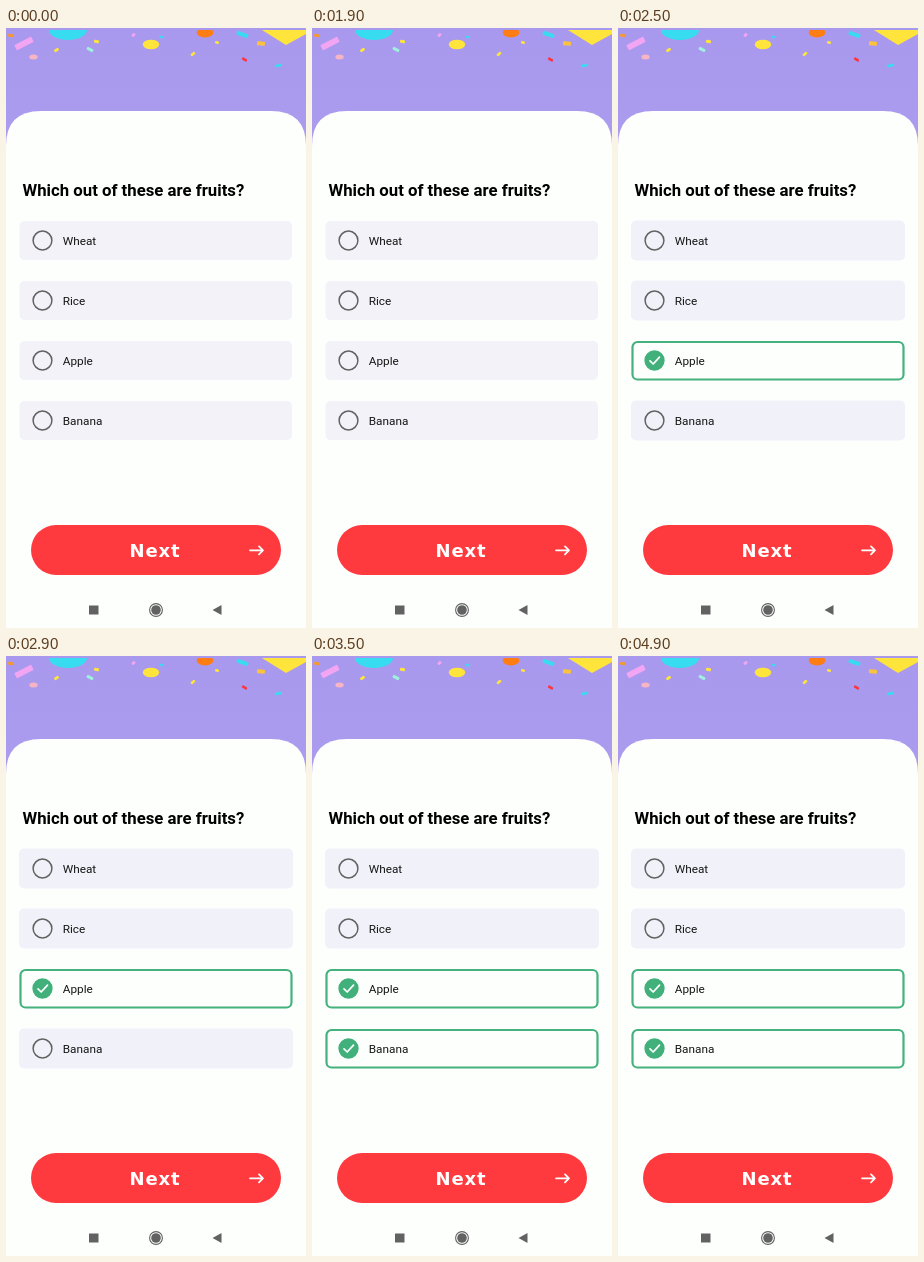
Write an HTML page that moves like this. It is 300 px wide and 600 px high and loops after 5.4 s.

```html
<!DOCTYPE html>
<html lang="en">
<head>
<meta charset="utf-8">
<title>Fruit quiz</title>
<style>
  html, body { margin: 0; width: 100%; height: 100%; overflow: hidden; }
  svg { display: block; width: 100%; height: 100%; }
  text { font-family: Roboto, sans-serif; }
  .question { font-size: 16.75px; font-weight: 700; }
  .label { font-size: 11.8px; fill: #161616; }
  .next { font: 800 18px "DejaVu Sans", sans-serif; fill: #fff; letter-spacing: .9px; }
  .line { fill: none; stroke: #fff; stroke-width: 1.7; stroke-linecap: round; stroke-linejoin: round; }
</style>
</head>
<body>
<svg viewBox="0 0 300 600">
  <defs>
    <linearGradient id="sky" x2="0" y2="1">
      <stop stop-color="#a899ee"/><stop offset="1" stop-color="#ac9cef"/>
    </linearGradient>
    <clipPath id="below"><path d="M0 2H300V80H0z"/></clipPath>
  </defs>
  <rect width="300" height="130" fill="url(#sky)"/>
  <g id="confetti" clip-path="url(#below)"></g>
  <path d="M0 600V118Q0 83 35 83H265Q300 83 300 118V600z" fill="#fdfffd"/>
  <text class="question" x="16.5" y="168">Which out of these are fruits?</text>
  <g id="options"></g>
  <rect x="25" y="497" width="250" height="50" rx="25" fill="#ff3a3e"/>
  <text class="next" x="123.5" y="528.5">Next</text>
  <path class="line" d="M244 522.3H257M253 518.3L257 522.3L253 526.3"/>
  <g fill="#626262">
    <path d="M83 577.5h9.5v9h-9.5zM206.5 582l9-5v10z"/>
    <circle cx="150" cy="582" r="4.8"/>
    <circle cx="150" cy="582" r="6.4" fill="none" stroke="#626262" stroke-width="1.1"/>
  </g>
</svg>
<script>
const LOOP = 5400, FADE = 100;
const OPTIONS = [["Wheat"], ["Rice"], ["Apple", 2400], ["Banana", 3300]];

const add = (parent, name, attrs, text = "") => {
  const node = document.createElementNS("http://www.w3.org/2000/svg", name);
  for (const key in attrs) node.setAttribute(key, attrs[key]);
  node.textContent = text;
  parent.append(node);
  return node;
};

const confetti = document.getElementById("confetti");
const ellipse = (cx, cy, rx, ry, fill) => add(confetti, "ellipse", { cx, cy, rx, ry, fill });
const scrap = (x, y, width, height, angle, fill) => add(confetti, "rect", {
  x: -width / 2, y: -height / 2, width, height, rx: 1, fill,
  transform: `translate(${x} ${y}) rotate(${angle})`
});
const YELLOW = "#ffe53b", CYAN = "#38dcf0", ORANGE = "#ff7d12", PINK = "#f1a5f2", GOLD = "#fcc23c";

ellipse(62, 2, 19, 10, CYAN);
ellipse(145, 16.5, 8.2, 4.8, YELLOW);
ellipse(199, 4.5, 8.3, 5, ORANGE);
ellipse(27.5, 29, 4.2, 2.5, "#f7b4c5");
add(confetti, "path", { d: "M256 2H300V6L280 17z", fill: YELLOW });
scrap(5, 7.5, 6, 3, 10, "#f59a32");
scrap(18, 15.5, 19, 6, -27, PINK);
scrap(50.5, 22, 5, 3, -35, YELLOW);
scrap(90.5, 13.5, 5, 3, 10, YELLOW);
scrap(84, 21.5, 7, 3, 28, "#9ff0dc");
scrap(127.5, 7, 4, 3, -45, PINK);
scrap(155.5, 9, 4, 2, 10, CYAN);
scrap(187, 26, 5, 2.6, -40, YELLOW);
scrap(211, 14.5, 4, 2.6, 15, YELLOW);
scrap(236.5, 6.5, 12, 4, 18, CYAN);
scrap(255, 15.5, 8, 4, 5, GOLD);
scrap(238.5, 31.5, 5.5, 2.6, 30, "#f73840");
scrap(272.5, 37.5, 7.5, 2.6, -12, CYAN);

const options = OPTIONS.map(([label, start = Infinity], i) => {
  const row = add(document.getElementById("options"), "g", { transform: `translate(0 ${193 + 60 * i})` });
  const box = add(row, "rect", { x: 13.5, y: 0, width: 273, height: 39, rx: 5 });
  const ring = add(row, "circle", { cx: 36.5, cy: 19.5, r: 9.4, "stroke-width": 1.5 });
  const tick = add(row, "path", { class: "line", d: "M32 19.8L35.2 23L41.5 16.2" });
  add(row, "text", { class: "label", x: 56.7, y: 24 }, label);
  return { start, box, ring, tick };
});

const set = (node, attrs) => {
  for (const key in attrs) node.setAttribute(key, attrs[key]);
};

function draw(time) {
  for (const { start, box, ring, tick } of options) {
    const selected = time >= start, settled = time >= start + FADE;
    set(box, selected
      ? { x: 14.5, y: 1, width: 271, height: 37.5, fill: "#fdfffd", stroke: "#45b17d", "stroke-width": 2.2 }
      : time < 2400
        ? { x: 13.5, y: 0, width: 272.5, height: 39, fill: "#f2f2f8", stroke: "none" }
        : { x: 13, y: -.5, width: 274, height: 40, fill: "#f1f2f9", stroke: "none" });
    set(ring, {
      fill: settled ? "#41b07b" : selected ? "#bfdccb" : "none",
      stroke: settled ? "#41b07b" : selected ? "#738078" : "#626262"
    });
    set(tick, { opacity: selected ? 1 : 0 });
  }
}

function frame(now) {
  draw(now % LOOP);
  requestAnimationFrame(frame);
}
draw(0);
requestAnimationFrame(frame);
</script>
</body>
</html>
```
